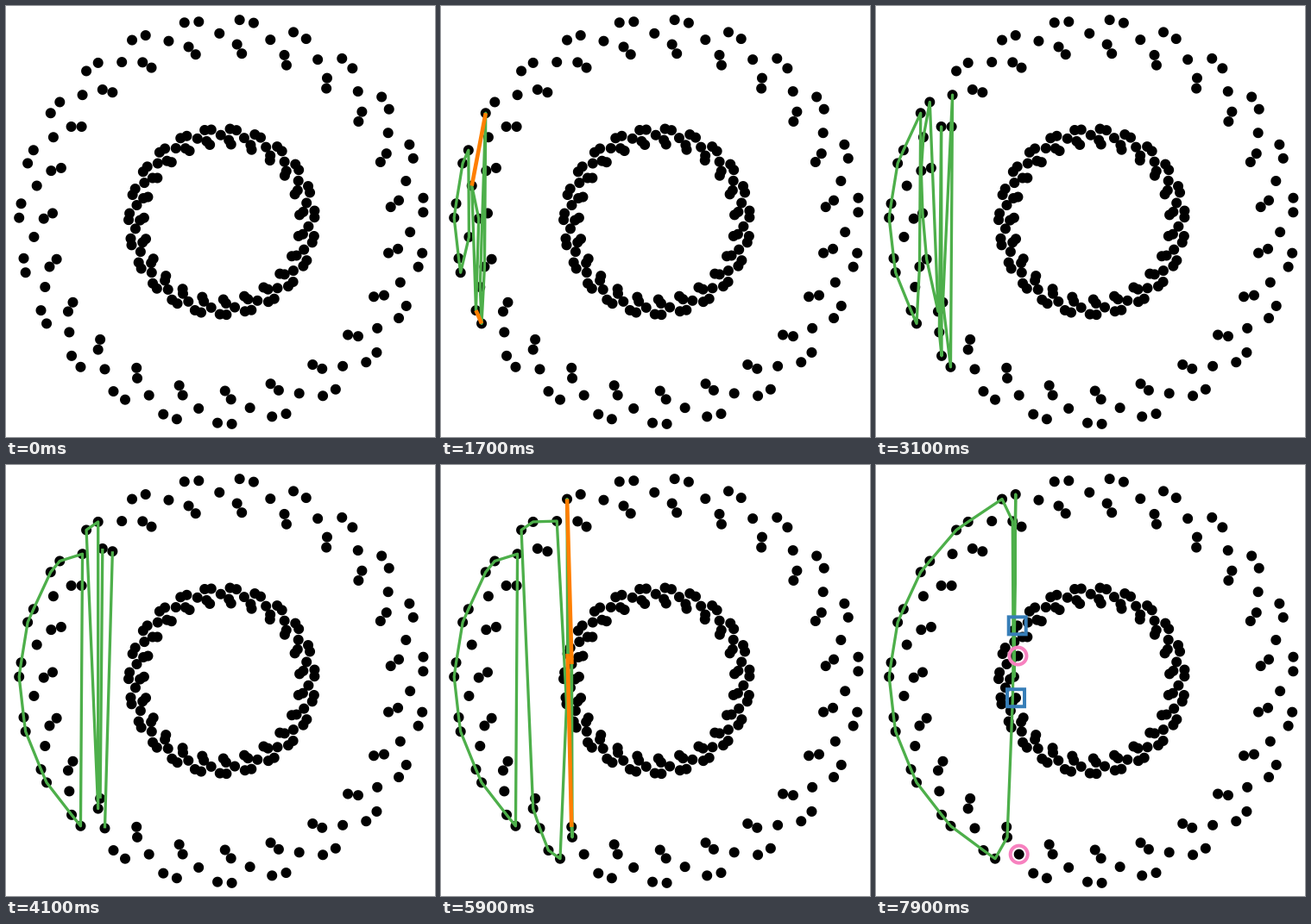
A matplotlib script that plays this animation: 497 by 500 pixels, repeating every 8000 ms.

```python
"""Divide-and-conquer convex hull over two scalloped rings of points."""
from itertools import islice

import numpy as np
import matplotlib.pyplot as plt
from matplotlib.animation import FuncAnimation
from matplotlib.collections import LineCollection, PolyCollection

W, H, DPI = 497, 500, 64
PT = 72 / DPI  # points per pixel
FRAMES, INTERVAL = 80, 100
BLUE, PINK, GREEN, ORANGE = "#377eb8", "#f781bf", "#4daf4a", "#ff7f00"

CENTER = np.array([250.1, 250.2])
LOBES, INNER = 23, 0.46
# One lobe of the ring: radius and angle (degrees) of its five points.
LOBE = np.array([(218.4, 3.17), (234.95, 8.93), (233.5, 12.98),
                 (196.35, 10.67), (206.4, 8.80)])


def make_points():
    turn = np.arange(LOBES)[:, None] * 360 / LOBES
    angle = np.radians(turn + LOBE[:, 1])
    ring = np.stack([np.cos(angle), np.sin(angle)], axis=-1) * LOBE[:, :1]
    ring = ring.reshape(-1, 2)
    pts = CENTER + np.concatenate([ring, ring * INNER])
    return pts[np.lexsort((pts[:, 1], pts[:, 0]))]


P = make_points()


def cross(o, a, b):
    (ux, uy), (vx, vy) = P[a] - P[o], P[b] - P[o]
    return ux * vy - uy * vx


def convex_hull(ids):
    """Monotone chain; ids are indices already sorted by x."""
    def chain(seq):
        out = []
        for i in seq:
            while len(out) > 1 and cross(out[-2], out[-1], i) <= 0:
                out.pop()
            out.append(i)
        return out[:-1]

    ids = sorted(ids)
    return chain(ids) + chain(ids[::-1])


def solve(lo, hi, hulls):
    """Yield (left marks, right marks, hulls, tangents) for each step."""
    if hi - lo <= 3:
        hulls.append(convex_hull(range(lo, hi)))
        return
    mid = (lo + hi) // 2
    yield range(lo, mid), range(mid, hi), list(hulls), []
    yield from solve(lo, mid, hulls)
    yield from solve(mid, hi, hulls)

    yield (), (), list(hulls), []
    merged = convex_hull(hulls[-2] + hulls[-1])
    edges = zip(merged, merged[1:] + merged[:1])
    bridges = [e for e in edges if (e[0] < mid) != (e[1] < mid)]
    yield (), (), list(hulls), bridges
    hulls[-2:] = [merged]


STEPS = [((), (), [], [])]
STEPS += islice(solve(0, len(P), []), FRAMES - 1)


def outlines(ids, radius, sides, start=0.0):
    """A regular polygon around each of the given points."""
    a = start + np.arange(sides) * 2 * np.pi / sides
    shape = radius * np.column_stack([np.cos(a), np.sin(a)])
    return [P[i] + shape for i in ids]


def circles(ids, radius):
    return outlines(ids, radius, 48)


def squares(ids, half):
    return outlines(ids, half * np.sqrt(2), 4, np.pi / 4)


fig = plt.figure(figsize=(W / DPI, H / DPI), dpi=DPI, facecolor="white")
ax = fig.add_axes([0, 0, 1, 1])
ax.set(xlim=(0, W), ylim=(H, 0))
ax.axis("off")


def stroke(kind, color, width, z, **kw):
    style = {"facecolors": "none"} if kind is PolyCollection else {}
    art = kind([], edgecolors=color, linewidths=width * PT, zorder=z,
               **style, **kw)
    art.set_snap(False)
    return ax.add_collection(art, autolim=False)


dots = PolyCollection(circles(range(len(P)), 6), facecolors="black",
                      edgecolors="none", zorder=1)
ax.add_collection(dots, autolim=False)
hull_art = stroke(PolyCollection, GREEN, 3.3, 2, joinstyle="round")
bridge_art = stroke(LineCollection, ORANGE, 4.6, 3, capstyle="butt")
left_art = stroke(PolyCollection, BLUE, 4, 4, joinstyle="miter")
right_art = stroke(PolyCollection, PINK, 4, 5)


def update(n):
    left, right, hulls, bridges = STEPS[n]
    left_art.set_verts(squares(left, 10))
    right_art.set_verts(circles(right, 10))
    hull_art.set_verts([P[h] for h in hulls])
    bridge_art.set_segments([P[list(b)] for b in bridges])
    return hull_art, bridge_art, left_art, right_art


anim = FuncAnimation(fig, update, frames=FRAMES, interval=INTERVAL,
                     repeat=True, repeat_delay=0, blit=False)
plt.show()
```
